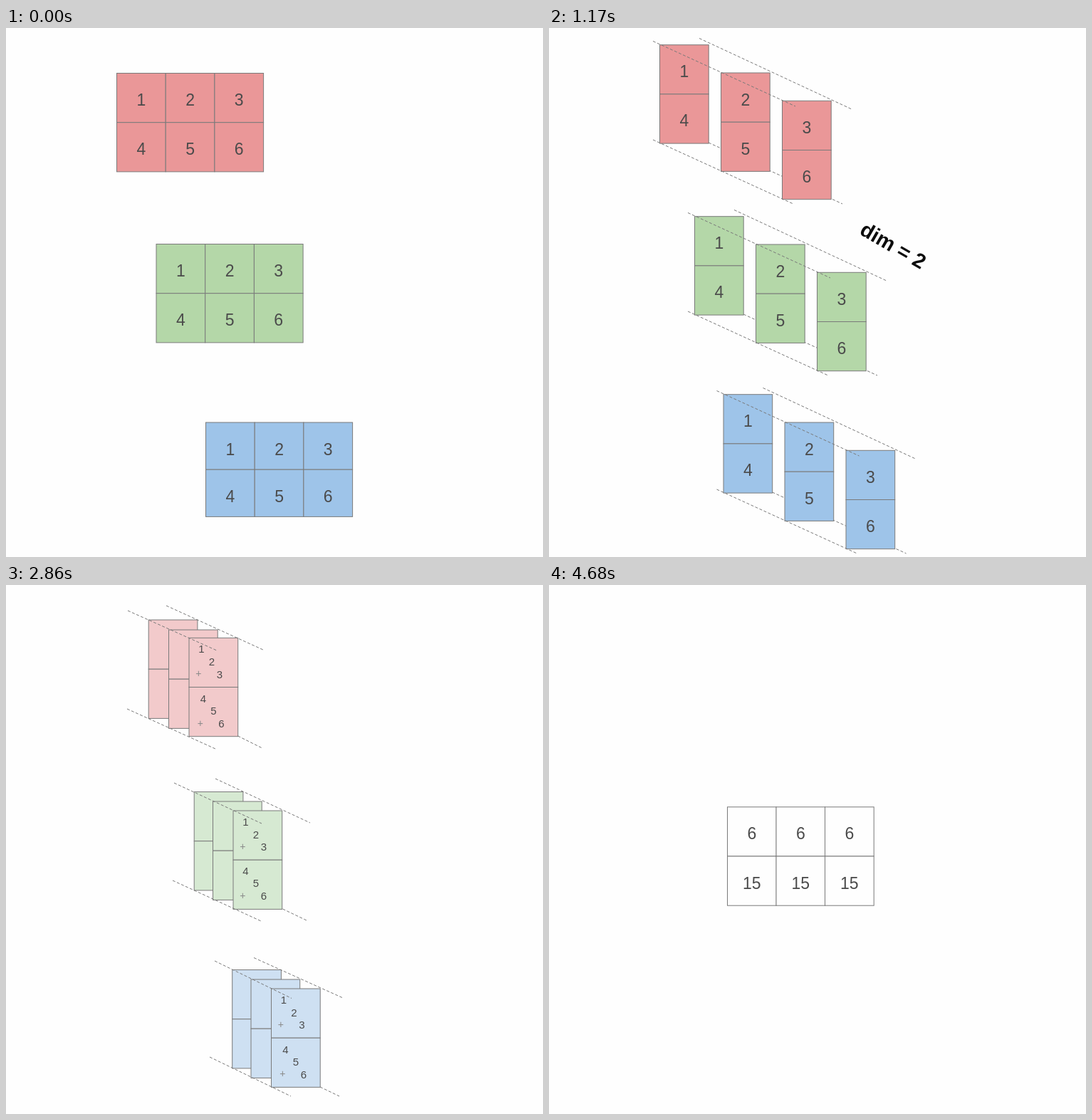
An HTML page for the animation above (5.46 s loop, 754x743 px).

```html
<!DOCTYPE html>
<html lang="en">
<head>
<meta charset="utf-8">
<title>Sum along dim 2</title>
<style>
  html, body { margin: 0; width: 100%; height: 100%; overflow: hidden; background: #fefefe; }
  svg { display: block; width: 754px; height: 743px; }
  .scene { visibility: hidden; }
  .scene.on { visibility: visible; }
  rect { stroke: #7a7a7a; stroke-width: 1; }
  path { fill: none; stroke: #7a7a7a; stroke-width: 1; stroke-dasharray: 4 2.6; }
  text { font-family: "Liberation Sans", Arial, sans-serif; text-anchor: middle; fill: #4b4b4b; }
  .big { font-size: 23px; }
  .small { font-size: 15px; }
  .plus { font-size: 14px; fill: #8a8a8a; }
  .dim { font-size: 29px; font-weight: bold; fill: #0c0c0c; }
</style>
</head>
<body>
<svg id="stage" viewBox="0 0 754 743"></svg>
<script>
const LOOP = 5460;
const W = 68.7, H = 69.2;
const FULL = ['#ea9798', '#b4d7a8', '#9ec4e9'];
const PALE = ['#f2cacb', '#d6e9d2', '#cee0f2'];
const stage = document.getElementById('stage');

function add(parent, tag, attrs, text) {
  const el = document.createElementNS('http://www.w3.org/2000/svg', tag);
  for (const key in attrs) el.setAttribute(key, attrs[key]);
  if (text !== undefined) el.textContent = text;
  parent.append(el);
  return el;
}

function label(g, cls, x, y, text) {
  add(g, 'text', { class: cls, x, y }, text);
}

// Two stacked cells with an optional number in each
function panel(g, x, y, fill, values = [], h = H) {
  for (const row of [0, 1]) {
    add(g, 'rect', { x, y: y + row * h, width: W, height: h, fill });
    if (values.length) label(g, 'big', x + W / 2, y + row * h + 45.5, values[row]);
  }
}

function columns(g, points, fill, h) {
  points.forEach(([x, y], i) => panel(g, x, y, fill, [i + 1, i + 4], h));
}

const row = (x, y, dx) => [0, 1, 2].map(i => [x + i * dx, y]);
const spread = ([x, y], dx, dy) => [-1, 0, 1].map(i => [x + i * dx, y + i * dy]);

function lines(g, d, [x, y]) {
  add(g, 'path', { d, transform: `translate(${x} ${y})` });
}

function dimLabel(g) {
  add(g, 'text', { class: 'dim', y: 10.4, transform: 'translate(483.5 305) rotate(30)' }, 'dim = 2');
}

// Centre panel of each group once the columns are pulled apart
const MIDS = [[241.5, 63], [290.5, 304], [331, 554]];

function tables(g, dx) {
  columns(g, row(155.5, 63.5, dx), FULL[0]);
  columns(g, row(211, 303.5, dx), FULL[1]);
  columns(g, row(280.5, 554, dx), FULL[2], 66.2);
}

function stagger(g) {
  columns(g, [[155.5, 45], [241.5, 63], [327.5, 80.5]], FULL[0]);
  columns(g, [[207, 287], [293, 303.5], [379, 324]], FULL[1]);
  columns(g, [[252, 538], [337.5, 555.5], [423.5, 573]], FULL[2], 66.2);
}

function along(g, dx, dy) {
  MIDS.forEach((mid, i) => {
    lines(g, 'M-17.5 98l188 86', mid);
    columns(g, spread(mid, dx, dy), FULL[i]);
    lines(g, 'M-95.5-44.5l200 91.5M-30.5-48.5l215 100M-95.5 94l198 90.5', mid);
  });
  dimLabel(g);
}

const RAILS = [
  'M-57.5-27l125 56M-3.5-34l136 62M-58.5 111l126 57M97 149l33 16.5',
  'M-54.5-26l123 57M3.5-32l133 62M-56.5 111l124 57M98 151l35.5 17',
  'M-51-26l108 52.5M4-30.5l124 56M-58 109l114 55M97 151l27 13'
];

function sums(g, x, y, shift) {
  for (const r of [0, 1]) {
    const cx = x + r * shift, cy = y + r * (H + shift / 3 - .5);
    label(g, 'small', cx + 17.3, cy + 21, 1 + 3 * r);
    label(g, 'small', cx + 31.8, cy + 38.5, 2 + 3 * r);
    label(g, 'plus', cx + 13.3, cy + 54.8, '+');
    label(g, 'small', cx + 42.8, cy + 56.3, 3 + 3 * r);
  }
}

function stack(g, fills, push) {
  MIDS.forEach(([mx, y], i) => {
    const x = mx + (i - 1) * push;
    const back = i ? [-26.3, -13.5] : [-28.3, -14];
    const front = [x + 28.5, y + (i ? 13 : 11.3)];
    panel(g, x + back[0], y + back[1], fills[i]);
    panel(g, x, y, fills[i]);
    panel(g, ...front, fills[i]);
    sums(g, ...front, i === 1 ? 0 : 2.5);
    lines(g, RAILS[i], [x, y]);
  });
}

function results(g, points, fills) {
  points.forEach(([x, y], i) => panel(g, x, y, fills[i], [6, 15]));
}

const scenes = [
  [0, g => tables(g, W)],
  [260, g => tables(g, 86)],
  [650, stagger],
  [1170, g => along(g, 86, 39.3)],
  [1690, g => along(g, 57, 26)],
  [2080, g => { stack(g, FULL, 0); dimLabel(g); }],
  [2860, g => stack(g, PALE, 13)],
  [3640, g => results(g, [[237.5, 119.5], [320, 317], [391.5, 521.5]], PALE)],
  [4160, g => results(g, [[250.5, 176.5], [320, 317], [391.5, 459]], PALE)],
  [4680, g => results(g, row(250.5, 311.8, 68.5), ['#fefefe', '#fefefe', '#fefefe'])]
].map(([start, draw]) => {
  const g = add(stage, 'g', { class: 'scene' });
  draw(g);
  return { start, g };
});

let shown;
function tick() {
  const t = performance.now() % LOOP;
  const now = scenes.findLast(s => s.start <= t);
  if (now !== shown) {
    if (shown) shown.g.classList.remove('on');
    now.g.classList.add('on');
    shown = now;
  }
  requestAnimationFrame(tick);
}
tick();
</script>
</body>
</html>
```
